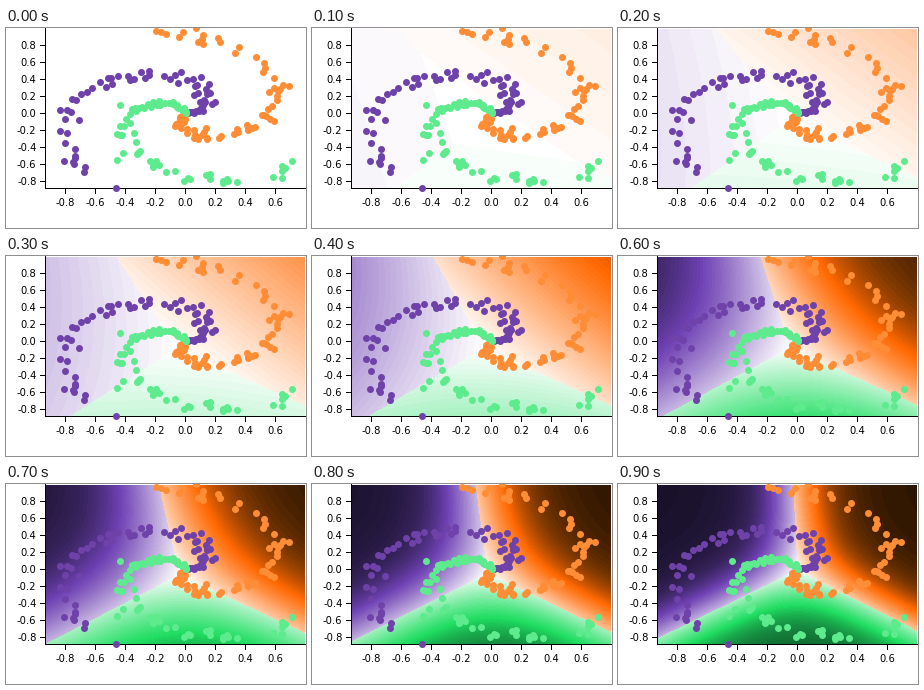
These frames come from a looping animation (300 by 200 pixels, 1000 ms). A matplotlib script:

```python
import numpy as np
import matplotlib.pyplot as plt
from matplotlib.animation import FuncAnimation

W, H, DPI = 300, 200, 100
FRAMES, INTERVAL = 10, 100
LEFT, BOTTOM = 40, 160                # corner of the plot area
RIGHT, TOP = 299, 1
X0, Y0, SX, SY = 179.5, 85, 150, 85   # origin and scale of the data axes
POINTS, TURN, JITTER = 68, 4, .19     # spiral arms, angles in radians
LEVELS = 60                           # colour bands per class
PX = 72 / DPI                         # points per pixel

plt.rcParams["font.family"] = "DejaVu Sans"

DOT_COLORS = ["#6f42a9", "#ff8d36", "#5deb8e"]   # purple, orange, green

# Colour ramps from an undecided white to a confident dark shade.
STOPS = [0, .6, .82, 1]
RAMPS = [
    ["white", "#6f42b4", "#37235c", "#19112a"],
    ["white", "#ff6800", "#823a00", "#2a1502"],
    ["white", "#20de62", "#168c40", "#0c5526"],
]

grid_x, grid_y = np.meshgrid(
    (np.arange(LEFT, RIGHT) + .5 - X0) / SX,
    (Y0 - np.arange(TOP, BOTTOM) - .5) / SY,
)


def class_scores(frame):
    """Linear classifier whose weights grow and turn during training."""
    u = frame / (FRAMES - 1)
    gain = 4.2 * u ** 1.65
    settle = 1 - u ** 6
    dx, dy = grid_x + .05 * settle, grid_y + .01 + .07 * settle
    purple = -(.4 + .42 * u) * dx + (.25 + .7 * u) * dy
    orange = (.8 + .1 * u ** 6) * dx + dy
    return gain * np.array([purple, orange, 0 * dx])


def decision_map(frame):
    weights = np.exp(class_scores(frame))
    probs = weights / weights.sum(axis=0)
    winner = probs.argmax(axis=0)
    level = (probs.max(axis=0) - 1 / 3) * 1.5
    level = np.round(level * LEVELS) / LEVELS
    image = np.empty(level.shape + (3,))
    for k, ramp in enumerate(RAMPS):
        mask = winner == k
        for channel, values in enumerate(zip(*map(plt.matplotlib.colors.to_rgb, ramp))):
            image[mask, channel] = np.interp(level[mask], STOPS, values)
    return image


def spiral_arm(k, rng):
    radius = np.linspace(0, 1, POINTS)
    angle = TURN * (k + radius) + rng.normal(0, JITTER, POINTS)
    x = np.maximum(X0 + SX * radius * np.cos(angle), LEFT)
    y = np.minimum(Y0 - SY * radius * np.sin(angle), BOTTOM)
    return x, y


def draw_axes():
    line = dict(color="black", lw=PX, solid_capstyle="butt", snap=False, zorder=2)
    text = dict(fontsize=10 * PX, color="black", va="baseline")
    ax.plot([LEFT - .5] * 2, [0, BOTTOM + 1], **line)
    ax.plot([LEFT - 1, W], [BOTTOM + .5] * 2, **line)
    for i in range(-4, 5):
        label = f"{i / 5:.1f}"
        y = Y0 - i * SY / 5
        ax.plot([LEFT - 6, LEFT], [y + .5] * 2, **line)
        ax.text(30.5, y + 4, label, ha="right", **text)
        if i < 4:
            x = X0 + i * SX / 5
            ax.plot([x, x], [BOTTOM, BOTTOM + 6], **line)
            ax.text(x - .5, 177.5, label, ha="center", **text)


fig = plt.figure(figsize=(W / DPI, H / DPI), dpi=DPI, facecolor="white")
ax = fig.add_axes([0, 0, 1, 1])
surface = ax.imshow(decision_map(0), extent=(LEFT, RIGHT, BOTTOM, TOP),
                    interpolation="nearest", aspect="auto", zorder=1)
draw_axes()
rng = np.random.default_rng(4)
for k, color in enumerate(DOT_COLORS):
    ax.scatter(*spiral_arm(k, rng), s=(7 * PX) ** 2, color=color, linewidths=0, zorder=3)
ax.set_xlim(0, W)
ax.set_ylim(H, 0)
ax.axis("off")


def update(frame):
    surface.set_data(decision_map(frame))
    return [surface]


anim = FuncAnimation(fig, update, frames=FRAMES, interval=INTERVAL,
                     repeat=True, repeat_delay=0, blit=False)
plt.show()
```
